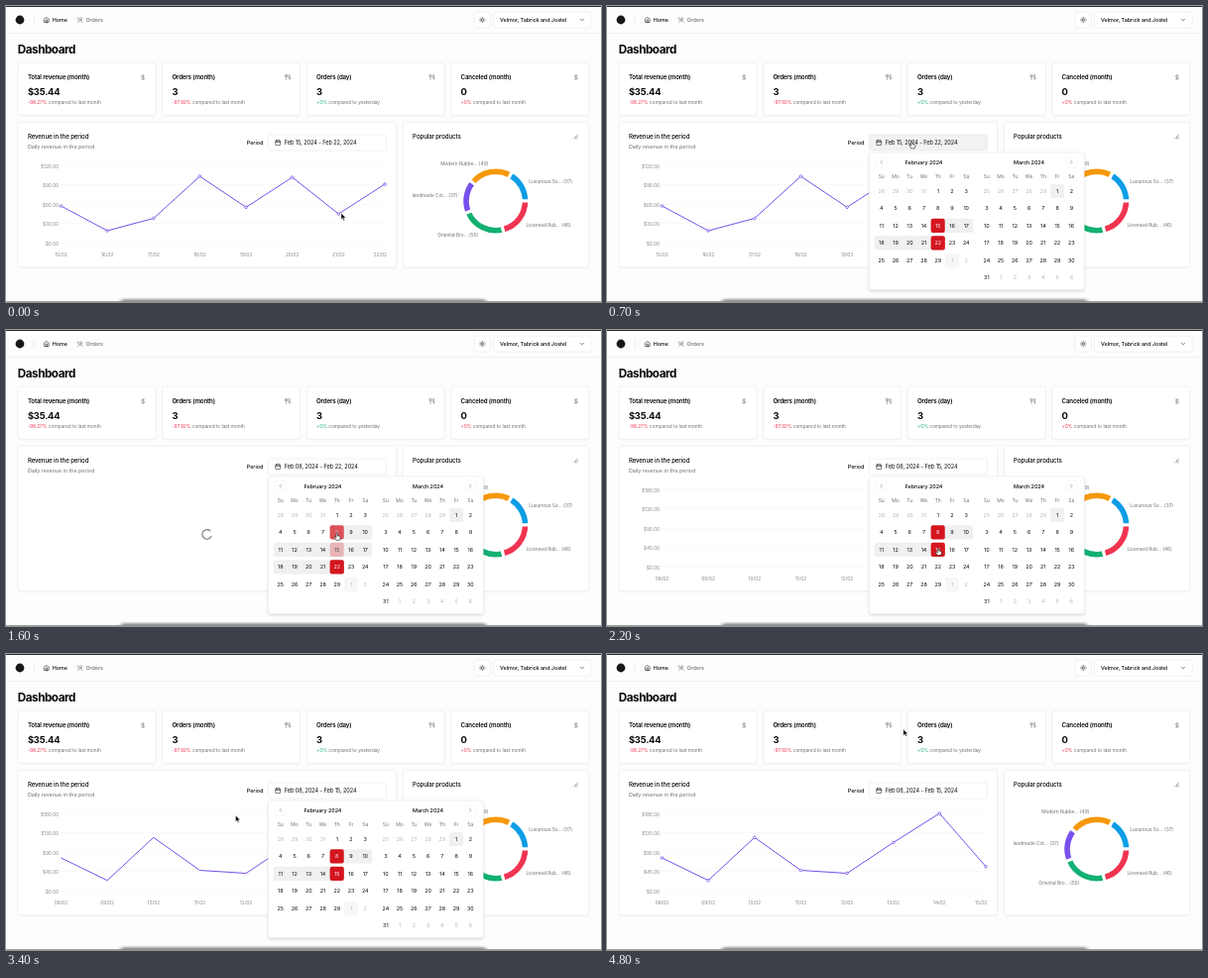
Write an HTML page that moves like this. It is 600x299 px and loops after 5 s.

```html
<!DOCTYPE html>
<html lang="en">
<head>
<meta charset="utf-8">
<title>Dashboard</title>
<style>
  html, body { margin: 0; width: 100%; height: 100%; overflow: hidden; background: #fdfdfd; }
  svg { display: block; width: 600px; height: 299px; }
  text { font-family: Inter, "Liberation Sans", sans-serif; white-space: pre; }
</style>
</head>
<body>
<svg id="stage" viewBox="0 0 600 299" xmlns="http://www.w3.org/2000/svg">
  <defs>
    <filter id="soft" x="-10%" y="-300%" width="120%" height="700%"><feGaussianBlur stdDeviation="2 1.3"/></filter>
    <filter id="drop" x="-10%" y="-10%" width="120%" height="125%"><feDropShadow dx="0" dy="1.5" stdDeviation="1.6" flood-opacity=".13"/></filter>
    <filter id="lift" x="-5%" y="-5%" width="110%" height="115%"><feDropShadow dx="0" dy=".4" stdDeviation=".4" flood-opacity=".07"/></filter>
    <clipPath id="pieClip"><rect x="410" y="140" width="168" height="120"/></clipPath>
  </defs>
</svg>
<script>
const INK = '#09090b', MUTED = '#71717a', LINE = '#e2e2e5', ACCENT = '#f0f0f1';
const RED = '#d4161f', ROSE = '#f03350', GREEN = '#12b071', VIOLET = '#7850ec';
const LOOP = 5000, STEP = 100, LAST = 4800;
const CLICK = { open: 550, first: 1530, second: 2050, close: 3450 };
const LOADED = 2200, DRAW = 1500;

const stage = document.getElementById('stage');

function el(parent, tag, attrs = {}, content) {
  const node = document.createElementNS('http://www.w3.org/2000/svg', tag);
  set(node, attrs);
  if (content !== undefined) node.textContent = content;
  parent.appendChild(node);
  return node;
}
function set(node, attrs) {
  for (const key in attrs) node.setAttribute(key, attrs[key]);
}
// y is the middle of the capitals
function label(parent, x, y, str, size = 5.45, attrs = {}) {
  return el(parent, 'text', {
    x, y: y + size * 0.36, 'font-size': size, fill: INK, 'letter-spacing': '-.01em', ...attrs
  }, str);
}
function box(parent, x, y, width, height, rx, attrs = {}) {
  return el(parent, 'rect', { x, y, width, height, rx, fill: '#fff', stroke: LINE, 'stroke-width': 0.5, ...attrs });
}
// Icons live on a 24 unit grid, centred on cx, cy
function icon(parent, cx, cy, size, d, stroke = MUTED) {
  const k = size / 24;
  return el(parent, 'path', {
    d, fill: 'none', stroke, 'stroke-width': 2, 'stroke-linecap': 'round', 'stroke-linejoin': 'round',
    transform: `translate(${cx - size / 2} ${cy - size / 2}) scale(${k})`
  });
}

const ICON = {
  home: 'm3 9 9-7 9 7v11a2 2 0 0 1-2 2H5a2 2 0 0 1-2-2zM9 22V12h6v10',
  crossed: 'm16 2-2.3 2.3a3 3 0 0 0 0 4.2l1.8 1.8a3 3 0 0 0 4.2 0L22 8M15 15 3.3 3.3a4.2 4.2 0 0 0 0 6l7.3 7.3c.7.7 2 .7 2.8 0L15 15Zm0 0 7 7M2.1 21.8l6.4-6.3M19 5l-7 7',
  utensils: 'M3 2v7c0 1.1.9 2 2 2h4a2 2 0 0 0 2-2V2M7 2v20M21 15V2a5 5 0 0 0-5 5v6c0 1.1.9 2 2 2h3Zm0 0v7',
  dollar: 'M12 2v20M17 5H9.5a3.5 3.5 0 0 0 0 7h5a3.5 3.5 0 0 1 0 7H6',
  sun: 'M8 12a4 4 0 1 0 8 0a4 4 0 1 0-8 0M12 2v2M12 20v2M4.9 4.9l1.4 1.4M17.7 17.7l1.4 1.4M2 12h2M20 12h2M6.3 17.7l-1.4 1.4M19.1 4.9l-1.4 1.4',
  calendar: 'M8 2v4M16 2v4M3 10h18M5 4h14a2 2 0 0 1 2 2v14a2 2 0 0 1-2 2H5a2 2 0 0 1-2-2V6a2 2 0 0 1 2-2z',
  bars: 'M12 20V10M18 20V4M6 20v-4',
  down: 'm6 9 6 6 6-6', left: 'm15 18-6-6 6-6', right: 'm9 18 6-6-6-6',
  loader: 'M21 12a9 9 0 1 1-6.219-8.56'
};

// Easing
function bezier(x1, y1, x2, y2) {
  const at = (a, b, s) => 3 * a * s * (1 - s) ** 2 + 3 * b * s * s * (1 - s) + s ** 3;
  return x => {
    if (x <= 0) return 0;
    if (x >= 1) return 1;
    let lo = 0, hi = 1;
    for (let i = 0; i < 24; i++) {
      const mid = (lo + hi) / 2;
      if (at(x1, x2, mid) < x) lo = mid; else hi = mid;
    }
    return at(y1, y2, lo);
  };
}
const ease = bezier(0.25, 0.1, 0.25, 1);
const easeFast = bezier(0.4, 0, 0.2, 1);
const easeMove = bezier(0.4, 0, 0.4, 1);
const fade = (t, start, length = 150) => easeFast((t - start) / length);
const mix = (a, b, k) => {
  const part = (c, i) => parseInt(c.slice(1 + 2 * i, 3 + 2 * i), 16);
  return `rgb(${[0, 1, 2].map(i => Math.round(part(a, i) + (part(b, i) - part(a, i)) * k))})`;
};

// Header
el(stage, 'rect', { width: 600, height: 299, fill: '#fdfdfd' });
el(stage, 'rect', { y: 27, width: 600, height: 0.5, fill: LINE });
el(stage, 'circle', { cx: 14, cy: 14, r: 4.4, fill: '#18181b' });
el(stage, 'rect', { x: 27.8, y: 9.3, width: 0.5, height: 9.5, fill: LINE });
icon(stage, 40.8, 14, 6.4, ICON.home, INK);
label(stage, 46.7, 14, 'Home', 5.45, { 'font-weight': 500 });
icon(stage, 74.8, 14, 6.4, ICON.crossed);
label(stage, 80.5, 14, 'Orders', 5.45, { 'font-weight': 500, fill: MUTED });
box(stage, 472.3, 6, 16, 16, 2.4);
icon(stage, 480.3, 14, 6.6, ICON.sun, INK);
box(stage, 491.4, 6, 98.8, 16, 2.4);
label(stage, 498, 14, 'Velmor, Tabrick and Jostel', 5.45, { 'font-weight': 500 });
icon(stage, 581, 14, 6.2, ICON.down, INK);
label(stage, 11.8, 44.2, 'Dashboard', 11.7, { 'font-weight': 700, 'letter-spacing': '-.04em' });

// Metric cards
[
  ['Total revenue (month)', '$35.44', '-98.27%', 'last month', ROSE, ICON.dollar],
  ['Orders (month)', '3', '-97.92%', 'last month', ROSE, ICON.utensils],
  ['Orders (day)', '3', '+0%', 'yesterday', GREEN, ICON.utensils],
  ['Canceled (month)', '0', '+0%', 'last month', ROSE, ICON.dollar]
].forEach(([title, value, delta, since, color, mark], i) => {
  const x = 12 + 145.55 * i;
  box(stage, x, 57.2, 139.2, 53.2, 3.2, { filter: 'url(#lift)' });
  label(stage, x + 9.9, 72, title, 6.2, { 'font-weight': 600, 'letter-spacing': '-.028em' });
  label(stage, x + 9.9, 87, value, 9.4, { 'font-weight': 700, 'letter-spacing': '-.02em' });
  const note = label(stage, x + 9.9, 97.7, '', 4.85, { fill: MUTED });
  el(note, 'tspan', { fill: color }, delta);
  el(note, 'tspan', {}, ' compared to ' + since);
  icon(stage, x + 126.2, 72, 6.2, mark);
});

// Revenue card
box(stage, 12, 117, 381.8, 147, 3.2, { filter: 'url(#lift)' });
label(stage, 21.9, 131.8, 'Revenue in the period', 6.15, { 'font-weight': 500, 'letter-spacing': '-.018em' });
label(stage, 21.9, 142, 'Daily revenue in the period', 5.45, { fill: MUTED });
label(stage, 242.8, 138, 'Period', 5.45, { 'font-weight': 500 });
const picker = box(stage, 264.3, 130, 119.2, 16, 2.4);
icon(stage, 274.2, 138, 6.3, ICON.calendar, INK);
const rangeLabel = label(stage, 280.8, 138, '', 5.55);

function makeChart(firstDay, top, ys) {
  const g = el(stage, 'g');
  const px = i => 55.5 + 46.64 * i;
  for (let i = 0; i < 5; i++) {
    const y = 161 + 19.6 * i;
    el(g, 'rect', { x: 55.5, y: y - 0.2, width: 326.5, height: 0.4, fill: '#f1f1f3' });
    label(g, 53, y + 0.9, `$${(top * (4 - i) / 4).toFixed(2)}`, 4.85, { fill: '#888', 'text-anchor': 'end' });
  }
  ys.forEach((_, i) => {
    const day = String(firstDay + i).padStart(2, '0');
    label(g, i === 7 ? 377.2 : px(i), 251.5, day + '/02', 4.85, { fill: '#888', 'text-anchor': 'middle' });
  });
  const line = el(g, 'polyline', {
    points: ys.map((y, i) => `${px(i)},${y}`).join(' '), pathLength: 1,
    fill: 'none', stroke: VIOLET, 'stroke-width': 1
  });
  const dots = el(g, 'g', { fill: '#fff', stroke: VIOLET, 'stroke-width': 0.8 });
  ys.forEach((cy, i) => el(dots, 'circle', { cx: px(i), cy, r: 1.3 }));
  return { g, line, dots };
}
const before = makeChart(15, 120, [202, 227, 214.5, 172, 203.3, 173, 210, 180]);
const after = makeChart(8, 180, [206, 228.7, 185.3, 218.5, 221.5, 190.5, 161, 214.7]);
const spinner = el(stage, 'g');
icon(spinner, 0, 0, 12.7, ICON.loader);

// Popular products
box(stage, 400.2, 117, 187.6, 147, 3.2, { filter: 'url(#lift)' });
label(stage, 410.1, 131.8, 'Popular products', 6.15, { 'font-weight': 500, 'letter-spacing': '-.018em' });
icon(stage, 574.5, 132, 6.2, ICON.bars);
const pie = el(stage, 'g', { 'clip-path': 'url(#pieClip)' });
const products = [
  ['Luxurious So...', 37, '#0d9de6'], ['Modern Rubbe...', 49, '#f5980b'], ['Handmade Cot...', 37, VIOLET],
  ['Oriental Bro...', 50, GREEN], ['Licensed Rub...', 46, ROSE]
];
const total = products.reduce((sum, p) => sum + p[1], 0);
const polar = (r, a) => [493.8 + r * Math.cos(a), 197 - r * Math.sin(a)];
let turn = 0;
for (const [name, amount, fill] of products) {
  const a = turn, b = turn += amount / total * 2 * Math.PI, m = (a + b) / 2;
  const [R, r] = [34.1, 25.4];
  el(pie, 'path', {
    d: `M${polar(R, a)}A${R} ${R} 0 0 0 ${polar(R, b)}L${polar(r, b)}A${r} ${r} 0 0 1 ${polar(r, a)}Z`,
    fill, stroke: '#fff', 'stroke-width': 3.1
  });
  const [x, y] = polar(38.9, m);
  label(pie, x, y, `${name} (${amount})`, 4.85, { fill: MUTED, 'text-anchor': x > 493.8 ? 'start' : 'end' });
}

// Calendar popover
const CELL = 14.25, ROW = 17.46, MONTHS_X = [269.6, 375.7], DAYS_Y = 187;
const pop = el(stage, 'g');
box(pop, 264.4, 148, 216.8, 138.6, 2.4, { filter: 'url(#drop)' });
const cells = [];
[['February 2024', 4, 29, 31, 5], ['March 2024', 5, 31, 29, 6]].forEach(([title, lead, days, prev, rows], m) => {
  const x0 = MONTHS_X[m];
  const mid = { 'text-anchor': 'middle' };
  label(pop, x0 + CELL * 3.5, 157.7, title, 5.45, { ...mid, 'font-weight': 500 });
  const navX = m ? x0 + CELL * 7 - 7.1 : x0 + 7.1;
  const nav = el(pop, 'g', { opacity: 0.6 });
  box(nav, navX - 5.5, 152.2, 11, 11, 2.2);
  icon(nav, navX, 157.7, 6.2, m ? ICON.right : ICON.left, INK);
  ['Su', 'Mo', 'Tu', 'We', 'Th', 'Fr', 'Sa'].forEach((d, i) =>
    label(pop, x0 + CELL * (i + 0.5), 172.5, d, 5, { ...mid, fill: MUTED }));
  for (let i = 0; i < rows * 7; i++) {
    const n = i - lead + 1, inside = n >= 1 && n <= days;
    const shown = n < 1 ? prev + n : n > days ? n - days : n;
    const today = m ? n === 1 : n === 30;
    const col = i % 7, x = x0 + CELL * col, y = DAYS_Y + ROW * Math.floor(i / 7);
    const shape = { x, y: y - 7.1, width: CELL, height: 14.2, stroke: 'none' };
    const g = el(pop, 'g', { opacity: inside ? 1 : 0.5 });
    const band = el(g, 'path', { fill: ACCENT });
    const pill = el(g, 'rect', { ...shape, rx: 2.2 });
    const text = label(g, x + CELL / 2, y, shown, 5.45, { ...mid, fill: inside ? INK : MUTED });
    cells.push({ day: m || !inside ? 0 : n, today, inside, col, x, y, band, pill, text });
  }
});

function bandPath({ x, y, col }, first, last) {
  const l = first || col === 0 ? 2.2 : 0, r = last || col === 6 ? 2.2 : 0, h = 14.2;
  return `M${x + l} ${y - 7.1}h${CELL - l - r}q${r} 0 ${r} ${r}v${h - 2 * r}q0 ${r} ${-r} ${r}` +
    `h${l + r - CELL}q${-l} 0 ${-l} ${-l}v${2 * l - h}q0 ${-l} ${l} ${-l}z`;
}

const ranges = [[0, 15, 22], [CLICK.first, 8, 22], [CLICK.second, 8, 15]];

function drawCalendar(t, [mx, my], open) {
  const k = ranges.findLastIndex(r => t >= r[0]);
  const [start, from, to] = ranges[k], old = ranges[Math.max(k - 1, 0)];
  const blend = k ? fade(t, start) : 1;
  for (const c of cells) {
    const isEnd = (r) => c.day && (c.day === r[1] || c.day === r[2]) ? 1 : 0;
    const level = isEnd(old) * (1 - blend) + isEnd(ranges[k]) * blend;
    const inRange = c.day >= from && c.day <= to;
    const hover = open && Math.abs(mx - c.x - CELL / 2) < 7.1 && Math.abs(my - c.y) < 7.1;
    const base = inRange || c.today || hover ? ACCENT : '#ffffff';
    set(c.band, { d: inRange ? bandPath(c, c.day === from, c.day === to) : '' });
    set(c.pill, { fill: level ? mix(base, RED, level) : base, opacity: level || c.today || hover ? 1 : 0 });
    if (c.inside) set(c.text, { fill: mix(INK, '#fafafa', level) });
  }
  const pad = n => String(n).padStart(2, '0');
  rangeLabel.textContent = `Feb ${pad(from)}, 2024 - Feb ${pad(to)}, 2024`;
}

// Window edges
el(stage, 'rect', { x: 116, y: 296.2, width: 368, height: 5, rx: 2, fill: '#000', opacity: 0.45, filter: 'url(#soft)' });
el(stage, 'rect', { y: 298.2, width: 600, height: 0.8, fill: '#8c8c8c' });
el(stage, 'rect', { width: 600, height: 1, fill: '#303030' });

// Pointer
const arrow = el(stage, 'path', {
  d: 'M0 0v6.4l1.45-1.35 1 2.3 1.1-.5-1-2.2h2.05z', fill: '#000', stroke: '#fff', 'stroke-width': 0.45
});
const hand = el(stage, 'path', {
  d: 'M-.7 .6a.7 .7 0 0 1 1.4 0v2l2 .5a1 1 0 0 1 .8 1l-.4 2-.5 1h-3.3l-1.9-2.6c-.4-.7.4-1.2 1-.7l.9.7z',
  fill: '#fff', stroke: '#000', 'stroke-width': 0.55, 'stroke-linejoin': 'round'
});
const path = [
  [0, 338, 209.3], [100, 338, 209.3], [500, 307.5, 136.8], [700, 307.5, 136.8], [1400, 333.7, 205.2],
  [1650, 333.7, 205.2], [2000, 334, 220.5], [2200, 334, 220.5], [2700, 330, 207.8], [2800, 330, 207.8],
  [3400, 231.5, 163], [3500, 231.5, 163], [4000, 266.7, 214.2], [4200, 267, 214.2], [4700, 298.8, 76], [5000, 298.8, 76]
];
function pointerAt(t) {
  const i = path.findIndex(p => p[0] > t);
  const a = path[i - 1], b = path[i], k = easeMove((t - a[0]) / (b[0] - a[0]));
  return [a[1] + (b[1] - a[1]) * k, a[2] + (b[2] - a[2]) * k];
}

const show = (node, on) => set(node, { visibility: on ? 'visible' : 'hidden' });

function draw(t) {
  const [x, y] = pointerAt(t);
  const visible = fade(t, CLICK.open) * (1 - fade(t, CLICK.close));
  const scale = 0.95 + 0.05 * visible;
  const open = visible > 0;
  set(pop, {
    opacity: visible,
    transform: `translate(372.8 ${148 - 3 * (1 - visible)}) scale(${scale}) translate(-372.8 -148)`
  });
  show(pop, open);
  drawCalendar(t, [x, y], open);

  const onPicker = x > 264 && x < 384 && y > 130 && y < 146;
  const onDays = open && x > 269 && x < 476 && y > 179 && y < 282;
  set(picker, { fill: onPicker ? '#f2f2f3' : '#fff' });
  for (const node of [arrow, hand]) set(node, { transform: `translate(${x} ${y})` });
  show(hand, onPicker || onDays);
  show(arrow, !(onPicker || onDays));

  show(before.g, t < CLICK.first);
  show(spinner, t >= CLICK.first && t < LOADED);
  set(spinner, { transform: `translate(202.7 206.4) rotate(${(t - CLICK.first) * 0.36})` });
  const drawn = ease((t - LOADED) / DRAW);
  show(after.g, t >= LOADED);
  show(after.dots, drawn === 1);
  set(after.line, { 'stroke-dasharray': drawn === 1 ? 'none' : `${drawn} 2` });
}

const origin = performance.now();
function tick() {
  const t = (performance.now() - origin) % LOOP;
  draw(Math.min(LAST, Math.floor(t / STEP) * STEP));
  requestAnimationFrame(tick);
}
tick();
</script>
</body>
</html>
```
